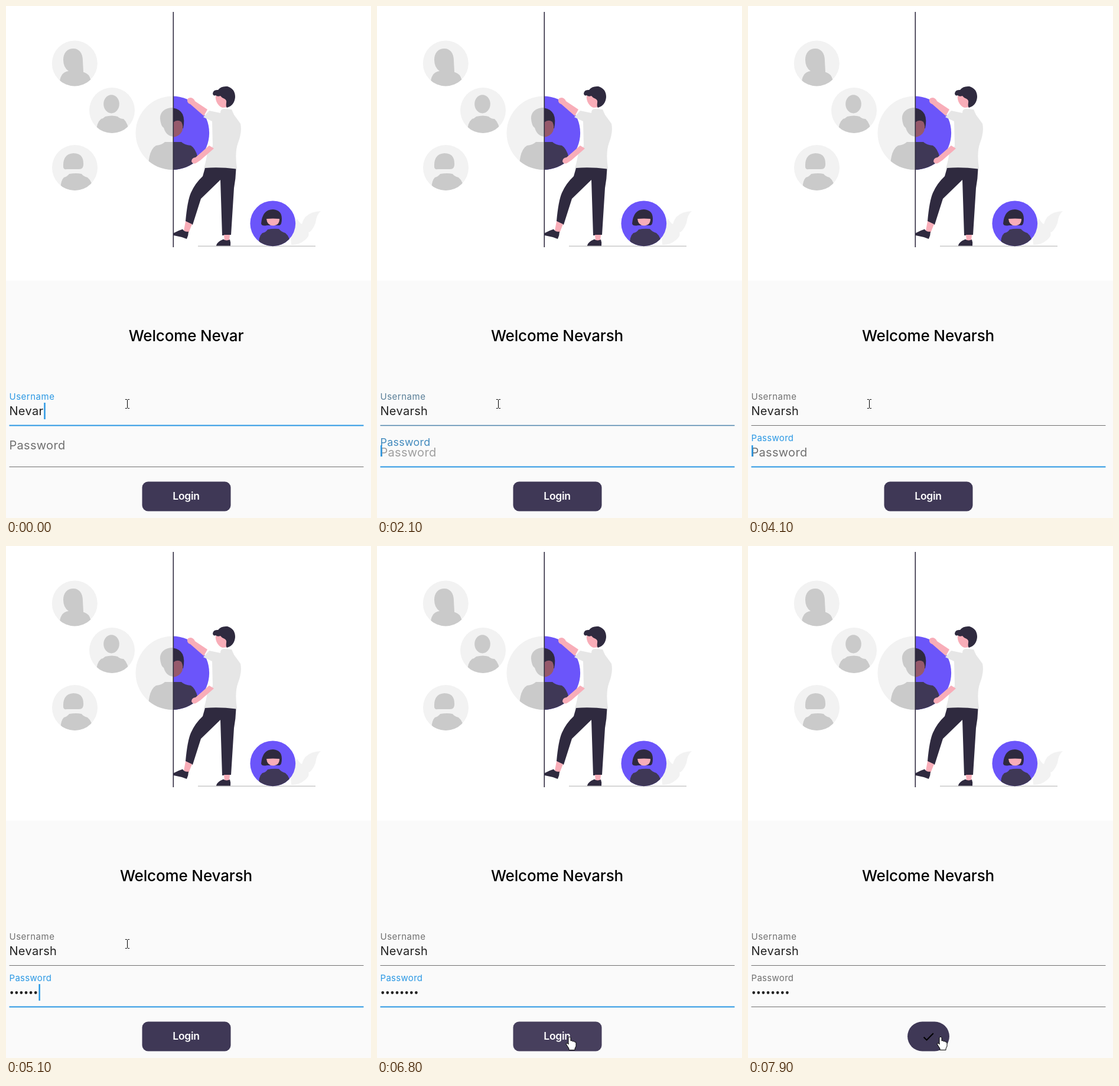
An HTML page that plays this animation: 618x866 px, repeating every 8 s.

```html
<!DOCTYPE html>
<html lang="en">
<head>
<meta charset="utf-8">
<title>Login</title>
<style>
html, body { margin: 0; width: 100%; height: 100%; overflow: hidden; background: #fff; }
svg { display: block; width: 618px; height: 866px; }
text { font-family: Inter, "Open Sans", sans-serif; letter-spacing: .3px; font-size: 20px; }
#title { font-size: 26px; font-weight: 550; letter-spacing: -.15px; }
#userLabel { font-size: 15px; letter-spacing: .5px; }
#login { font-size: 17.5px; font-weight: 600; letter-spacing: -.3px; }
.pale { fill: #f2f2f2; }
.grey { fill: #cacaca; }
.dark { fill: #2f2a3f; }
.navy { fill: #3f3856; }
.blue { fill: #6b55fa; }
.skin { fill: #f8adb8; }
.shirt { fill: #e6e6e6; }
</style>
</head>
<body>
<svg viewBox="0 0 618 866">
  <defs>
    <clipPath id="a"><circle cx="116.3" cy="97" r="38.5"/></clipPath>
    <clipPath id="b"><circle cx="179.5" cy="176.5" r="38.5"/></clipPath>
    <clipPath id="c"><circle cx="116.5" cy="273.5" r="38.5"/></clipPath>
    <clipPath id="d"><circle cx="281.8" cy="214.7" r="62.3"/></clipPath>
    <clipPath id="e"><circle cx="451.8" cy="367.8" r="38.4"/></clipPath>
  </defs>
  <rect y="464.5" width="618" height="402" fill="#fafafa"/>

  <g clip-path="url(#a)">
    <rect class="pale" x="77" y="58" width="80" height="80"/>
    <path class="grey" d="M97 91C97 79 104 72 114 72C124 72 130 80 130 92L131 112L125 110Q135 112 140 117Q145 124 145 140H90Q90 123 95 116Q99 111 106 110Q97 104 97 91Z"/>
  </g>
  <g clip-path="url(#b)">
    <rect class="pale" x="140" y="137" width="80" height="80"/>
    <ellipse class="grey" cx="178.5" cy="165.8" rx="13.3" ry="15.6"/>
    <path class="grey" d="M153 218Q152 198 161 191Q165 190 168 187Q180 184 189 187Q193 191 199 191Q208 199 208 218Z"/>
  </g>
  <g clip-path="url(#c)">
    <rect class="pale" x="77" y="234" width="80" height="80"/>
    <path class="grey" d="M97 272Q96 250 114 249Q131 249 131 266Q132 276 124 276H103Q97 277 97 272Z"/>
    <path class="grey" d="M93 315Q91 297 98 290Q103 289 107 284Q119 282 128 284Q131 288 138 290Q147 297 147 315Z"/>
  </g>
  <g clip-path="url(#d)">
    <rect class="pale" x="219" y="152" width="64.5" height="126"/>
    <rect class="blue" x="283.5" y="152" width="63" height="126"/>
    <path class="grey" d="M284 172C268 171 260 181 261 191Q262 203 267 206Q271 220 284 221Z"/>
    <path class="grey" d="M284 230H269Q264 235 254 236Q240 244 241 280H284Z"/>
    <path class="dark" d="M283 172.5Q294 174 299 183Q303 192 300 207H283Z"/>
    <path d="M283 197Q290 191 297 196Q301 204 298 212Q294 220 283 222Z" fill="#96596b"/>
    <path class="navy" d="M283 230H297Q302 235 313 236Q326 244 328 280H283Z"/>
  </g>

  <path class="skin" d="M307 161Q306 155 313 155Q318 156 320 161L341 175L335 186L312 166Q308 165 307 161Z"/>
  <path class="skin" d="M355 152Q354 158 358 165Q362 171 367 172L376 171L375 148L362 146Z"/>
  <path class="dark" d="M350 148Q351 141 359 142Q364 135 375 136Q388 140 388 154Q387 168 374 172Q372 169 373 164Q374 159 370 157Q366 156 363 152Q358 154 355 151Q351 153 350 148Z"/>
  <path class="shirt" d="M334 188L344 177L363 181Q363 174 369 174L382 175L386 184L397 199Q400 213 393 231Q387 247 391 275H335Q339 262 341 247L350 237L349 195Z"/>
  <path class="skin" d="M352 241L344 236L321 256Q314 257 314 263Q317 269 323 265L329 261Z"/>
  <path class="dark" d="M337 274Q362 272 389.5 275.5Q389 292 386 308L381 387L366 388L363 294L330 326L316 370L304 364Q307 330 313 316Q320 300 333 288Z"/>
  <path class="skin" d="M304 364L315 369L309 384L301 380ZM369 387H379L378 397H370Z"/>
  <path class="dark" d="M284 384Q291 380 299 377.5Q303 383 309 381.5Q309 388 306 394Q296 390 284 388ZM356 405Q357 399 368 394.5Q373 398 379 395Q381 400 380 406H356Z"/>
  <path class="pale" d="M483 404Q480 374 493 360Q497 367 501 369Q506 348 533 347Q526 352 524 367Q518 382 512 383Q515 388 506 396Q495 405 483 404Z"/>
  <path d="M325 406.3H524" stroke="#cacaca" stroke-width="1.6"/>
  <g clip-path="url(#e)">
    <rect class="blue" x="413" y="329" width="78" height="78"/>
    <path class="dark" d="M432 368Q434 344 452 344Q467 345 467 360Q467 370 463 371H442Q433 373 432 368Z"/>
    <path class="skin" d="M441 360Q452 359 463 360Q463 371 452 371.5Q442 371 441 360Z"/>
    <path class="navy" d="M428 407Q427 390 434 384Q440 383 443 378Q452 376 462 377Q466 382 473 384Q481 390 482 407Z"/>
  </g>
  <path d="M283.3 10V408" stroke="#2f2a3f" stroke-width="1.6"/>

  <text id="title" x="305" y="567" text-anchor="middle"></text>
  <text id="userLabel" x="5.5" y="666">Username</text>
  <text id="user" x="5.5" y="692" fill="#222"></text>
  <path id="userLine" d="M5.5 709.5H605.5"/>
  <text id="passLabel" x="5.5">Password</text>
  <text id="hint" x="5.5" y="762" fill="#707070">Password</text>
  <path id="dots" stroke="#222" stroke-width="4.8" stroke-linecap="round" stroke-dasharray="0 8.1"/>
  <path id="passLine" d="M5.5 779.5H605.5"/>
  <rect id="caret" width="2.5" fill="#2b98e4"/>

  <rect id="button" y="804.5" height="50"/>
  <text id="login" x="305" y="835" text-anchor="middle" fill="#fff">Login</text>
  <path id="check" transform="translate(293.5 818)" d="M9 16.2L4.8 12 3.4 13.4 9 19 21 7 19.6 5.6Z"/>

  <g id="pointer">
    <path id="beam" d="M-3.5 -7.5H-1L0 -6.5 1 -7.5H3.5M0 -6.5V6.5M-3.5 7.5H-1L0 6.5 1 7.5H3.5" fill="none" stroke="#000"/>
    <path id="arrow" d="M0 0V16L4 12.5 6.5 18 9 17 6.5 11.5H11.5Z" fill="#fff" stroke="#000"/>
    <path id="hand" d="M-2 1.5Q0 -1.5 2 1.5V7Q4 5.5 5.5 8Q7.5 6.5 8.5 9Q11 8 11 11V16Q10 18 9 20V22.5H-1V20L-5.5 13Q-6 10 -3.5 11L-2 13Z" fill="#fff" stroke="#000"/>
  </g>
</svg>
<script>
const LOOP = 8000, NAME = "Nevarsh";
const NAMED = 100, FOCUS = 2028, CLICK = 7110;
const KEYS = [4450, 4600, 4790, 4890, 4990, 5090, 5190, 5290];
const GREY = [112, 112, 112], BLUE = [43, 152, 228];

const el = {};
document.querySelectorAll("svg [id]").forEach(e => el[e.id] = e);
const set = (e, attrs) => { for (const k in attrs) e.setAttribute(k, attrs[k]); };
const show = (e, on) => set(e, { visibility: on ? "visible" : "hidden" });
const clamp = x => Math.max(0, Math.min(1, x));
const ease = x => { x = clamp(x); return x * x * (3 - 2 * x); };
const lerp = (a, b, p) => a + (b - a) * p;
const tint = p => `rgb(${GREY.map((g, i) => Math.round(lerp(g, BLUE[i], p)))})`;

// The underline takes its colour ahead of the label.
function field(label, line, focus) {
  const lit = clamp(focus * 1.5);
  set(label, { fill: tint(focus) });
  set(line, { stroke: tint(lit), "stroke-width": 1.2 + lit });
}

function drawForm(t) {
  const name = t < NAMED ? NAME.slice(0, 5) : NAME;
  el.title.textContent = "Welcome " + name;
  el.user.textContent = name;

  const float = ease((t - FOCUS) / 160);
  const tone = ease((t - FOCUS) / 120);
  const blur = ease((t - CLICK) / 200);
  field(el.userLabel, el.userLine, 1 - tone);
  field(el.passLabel, el.passLine, tone * (1 - blur));
  set(el.passLabel, { y: lerp(750, 736, float) });
  el.passLabel.style.fontSize = lerp(20, 15, float) + "px";

  const typed = KEYS.filter(k => k <= t).length;
  set(el.hint, { opacity: typed ? 0 : tone });
  set(el.dots, { d: `M9.7 755.5h${8.1 * typed - 8}` });
  show(el.dots, typed);

  // The caret blinks from the latest key press or focus.
  const last = Math.max(...[-400, NAMED, FOCUS, ...KEYS].filter(k => k <= t));
  show(el.caret, t < CLICK && (t - last) % 1000 < 500);
  if (t < FOCUS) set(el.caret, { x: 6.5 + el.user.getComputedTextLength(), y: 671, height: 28 });
  else if (typed) set(el.caret, { x: 6.8 + 8.1 * typed, y: 741, height: 28 });
  else set(el.caret, { x: 6, y: 743, height: 19 });
}

function drawButton(t) {
  const p = clamp((t - CLICK) / 1000), width = lerp(150, 50, p);
  const move = ease((t - 5900) / 600);
  const x = lerp(205.5, 326, move), y = lerp(673, 830, move);
  const over = y >= 805;
  set(el.button, {
    x: 305.5 - width / 2, width, rx: Math.min(25, lerp(10, 50, p)),
    fill: over && !p ? "#473f5d" : "#3f3856"
  });
  show(el.login, !p);
  show(el.check, p);
  set(el.pointer, { transform: `translate(${x} ${y})` });
  show(el.beam, y < 780);
  show(el.arrow, y >= 780 && !over);
  show(el.hand, over);
}

function frame(now) {
  const t = now % LOOP;
  drawForm(t);
  drawButton(t);
  requestAnimationFrame(frame);
}
frame(0);
</script>
</body>
</html>
```
